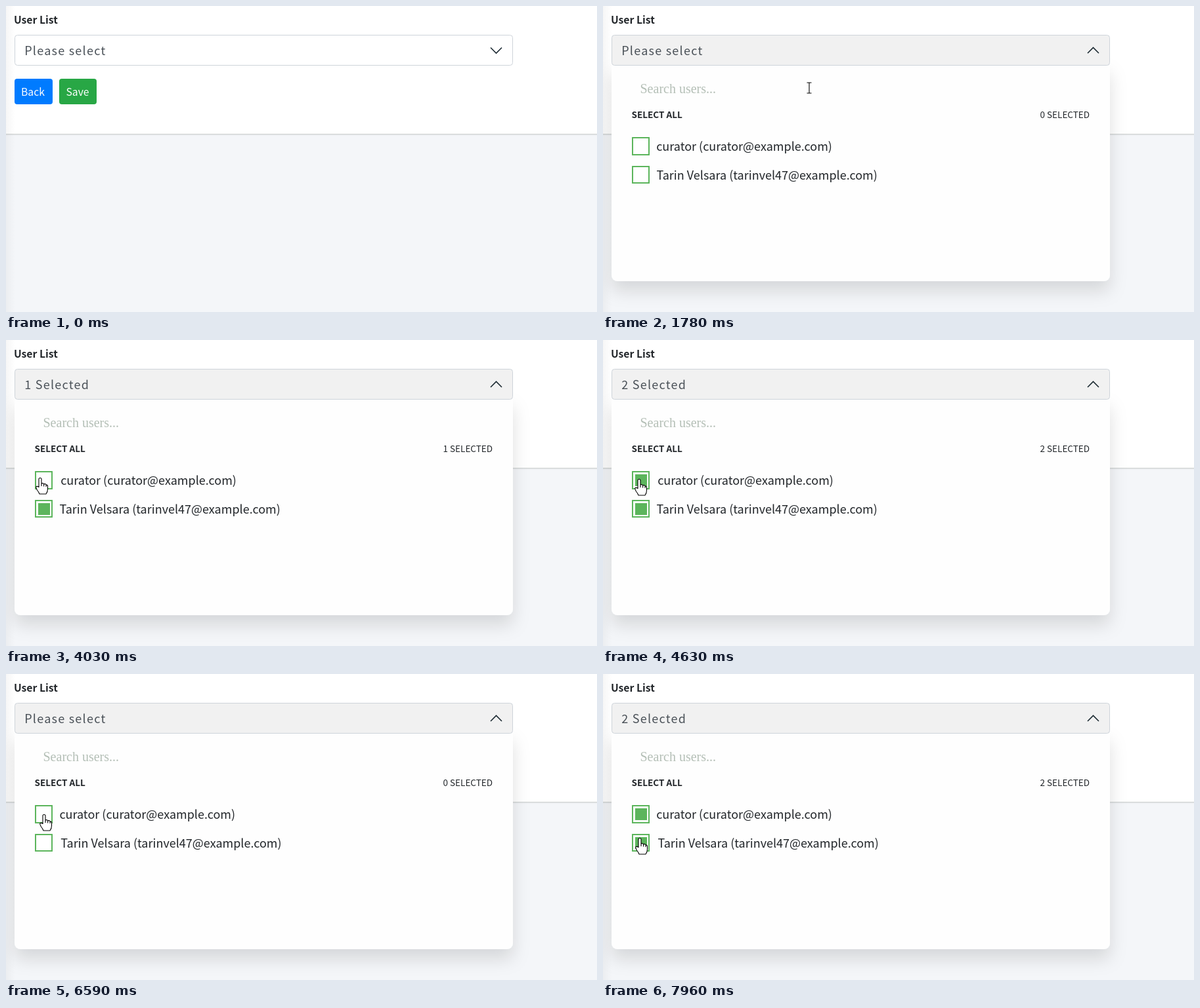
Recreate the animation shown at these times as an HTML page. Size 900 px wide and 467 px high, loop 8 s.

```html
<!DOCTYPE html>
<html lang="en">
<head>
<meta charset="utf-8">
<title>User list select</title>
<style>
  html, body { margin: 0; width: 100%; height: 100%; overflow: hidden; background: #f4f6f9; }
  svg { display: block; width: 900px; height: 467px; }
  text { font-family: "Noto Sans CJK SC", "Noto Sans CJK JP", "Noto Sans CJK", "Noto Sans", sans-serif; fill: #212529; white-space: pre; }
  .label { font-size: 15.7px; }
  .bold { font-weight: 700; }
  .button { fill: #fff; }
  .small { font-size: 13.5px; }
  .option { font-size: 18px; }
  .value { font-size: 18px; letter-spacing: 1.25px; fill: #495057; }
  .placeholder { font: 20px "Liberation Serif", serif; fill: #b4bfb6; }
  .box { fill: #fff; stroke: #5cb55c; stroke-width: 2; }
  .tick { fill: #5cb55c; }
  .cursor path { fill: #fff; stroke: #000; stroke-width: 1.1; stroke-linejoin: round; }
</style>
</head>
<body>
<svg viewBox="0 0 900 467">
  <defs>
    <filter id="shadow" x="-10%" y="-10%" width="120%" height="130%">
      <feDropShadow dx="0" dy="15" stdDeviation="13" flood-color="#000" flood-opacity=".125"/>
    </filter>
    <linearGradient id="edge">
      <stop stop-color="#000" stop-opacity=".035"/>
      <stop offset="1" stop-color="#000" stop-opacity="0"/>
    </linearGradient>
  </defs>

  <rect width="900" height="467" fill="#f4f6f9"/>
  <rect width="900" height="195" fill="#fff"/>
  <rect y="195" width="900" height="1" fill="#d0d4d3"/>
  <rect y="196" width="900" height="1" fill="#e3e6e8"/>
  <rect y="197" width="900" height="1" fill="#eef0f4"/>
  <rect width="14" height="467" fill="url(#edge)"/>

  <text class="label bold" x="12" y="27">User List</text>
  <rect x="13" y="111" width="58" height="39" rx="4" fill="#007bff"/>
  <text class="label button" x="23" y="137">Back</text>
  <rect x="81" y="111" width="57" height="39" rx="4" fill="#28a745"/>
  <text class="label button" x="91.5" y="137">Save</text>

  <g id="panel">
    <path d="M13 88H772V411a9 9 0 0 1-9 9H22a9 9 0 0 1-9-9Z" fill="#fefefe" filter="url(#shadow)"/>
    <rect id="focus" x="44" y="104" width="697" height="45" rx="2" fill="#fff" stroke="#101010" stroke-width="2"/>
    <text class="placeholder" x="56.5" y="133">Search users...</text>
    <text class="small bold" x="43.5" y="171">SELECT ALL</text>
    <text class="small" id="count" x="741" y="171" text-anchor="end"></text>
    <g id="rows"></g>
  </g>

  <rect id="field" x="13.5" y="44.5" width="758" height="46" rx="4" stroke="#ced4da"/>
  <text class="value" id="value" x="28.2" y="75"></text>
  <path id="chevron" fill="none" stroke="#1d2b33" stroke-width="1.6"/>

  <g class="cursor" id="cursor">
    <path id="arrow" d="M0 0v17l4-3.6 2.7 6 2.6-1.1-2.6-5.8h5.3Z"/>
    <path id="beam" d="M-3.5-8h7M0-8V8M-3.5 8h7"/>
    <path id="hand" transform="translate(-1 -1.5)" d="M-2 14V2a2 2 0 0 1 4 0V8.5q3-1 3.6.9q3-.8 3.5 1.2q2.4-.2 2.4 2V17q0 4-2.5 7.5H-1q-1-3-3.6-6l-1.6-3.6q-.3-2 1.4-2T-2 14ZM2 8.5v4M5.6 9.4v3.5M9.1 10.6v3"/>
  </g>
</svg>
<script>
const LOOP = 8000, OPEN_AT = 1100, END = Infinity;
const $ = id => document.getElementById(id);
const clamp = v => Math.min(1, Math.max(0, v));
const smooth = v => v * v * (3 - 2 * v);
const within = (t, spans) => spans.some(([from, to]) => t >= from && t < to);
const show = (el, on) => el.style.display = on ? '' : 'none';

const focusSpans = [[1910, 3350]];
const rows = [
  { name: 'curator (curator@example.com)', y: 200, x: 81.2, boxHeight: 26,
    checked: [[4170, 5180], [6750, END]],
    hovered: [[2640, 2720], [3740, 5430], [6560, 7070]] },
  { name: 'Tarin Velsara (tarinvel47@example.com)', y: 244, x: 81.4, boxHeight: 25,
    checked: [[3350, 5920], [7260, END]],
    hovered: [[2720, 3740], [5460, 6560], [7090, END]] },
];

// Pointer stops: time, x, y
const stops = [
  [260, 822, 438], [960, 310, 66], [1250, 310, 66], [1780, 314, 125],
  [2440, 314, 125], [2850, 241, 251], [3210, 57, 250], [3500, 57, 250],
  [4030, 53, 212], [4170, 53, 212], [4630, 56, 214], [5300, 56, 214],
  [5510, 57, 245], [5850, 57, 262], [5950, 57, 262], [6190, 57, 254],
  [6390, 57, 254], [6590, 59, 216], [6900, 59, 216], [7190, 57, 262],
  [7300, 57, 262], [7810, 57, 254], [7960, 57, 252],
];

for (const row of rows) {
  $('rows').insertAdjacentHTML('beforeend',
    `<rect class="box" x="45" y="${row.y + 1}" width="25" height="${row.boxHeight}"/>
     <rect class="tick" x="49" y="${row.y + 5}" width="18" height="18"/>
     <text class="option" y="${row.y + 21}">${row.name}</text>`);
  row.label = $('rows').lastElementChild;
  row.tick = row.label.previousElementSibling;
}

function pointerAt(t) {
  const next = stops.findIndex(stop => stop[0] > t);
  if (next < 0) return stops[stops.length - 1].slice(1);
  const [t0, x0, y0] = stops[next - 1], [t1, x1, y1] = stops[next];
  const k = smooth((t - t0) / (t1 - t0));
  return [x0 + (x1 - x0) * k, y0 + (y1 - y0) * k];
}

function hoverAmount(t, spans) {
  const ramp = start => smooth(clamp((t - start) / 150));
  return spans.reduce((sum, [from, to]) => sum + ramp(from) - ramp(to), 0);
}

function drawPointer(t, open) {
  show($('cursor'), t >= stops[0][0]);
  if (t < stops[0][0]) return;
  const [x, y] = pointerAt(t);
  const inside = x > 13 && x < 772;
  const between = (top, bottom) => inside && y > top && y < bottom;
  const kind = open && between(103, 150) ? 'beam'
    : between(44, 91) || open && between(192, 281) ? 'hand' : 'arrow';
  for (const id of ['arrow', 'beam', 'hand']) show($(id), id === kind);
  $('cursor').setAttribute('transform', `translate(${x} ${y})`);
}

function draw(t) {
  const open = t >= OPEN_AT;
  const count = rows.filter(row => within(t, row.checked)).length;

  show($('panel'), open);
  $('panel').style.opacity = smooth(clamp((t - OPEN_AT) / 200));
  show($('focus'), within(t, focusSpans));
  $('field').setAttribute('fill', open ? '#f1f1f1' : '#fff');
  $('chevron').setAttribute('d', open ? 'M738 72l8.5-8.5 8.5 8.5' : 'M738 63.5l8.5 8.5 8.5-8.5');
  $('value').textContent = count ? `${count} Selected` : 'Please select';
  $('count').textContent = `${count} SELECTED`;

  for (const row of rows) {
    show(row.tick, within(t, row.checked));
    row.label.setAttribute('x', row.x + 2 * hoverAmount(t, row.hovered));
  }
  drawPointer(t, open);
}

const start = performance.now();
function frame() {
  draw((performance.now() - start) % LOOP);
  requestAnimationFrame(frame);
}
frame();
</script>
</body>
</html>
```
